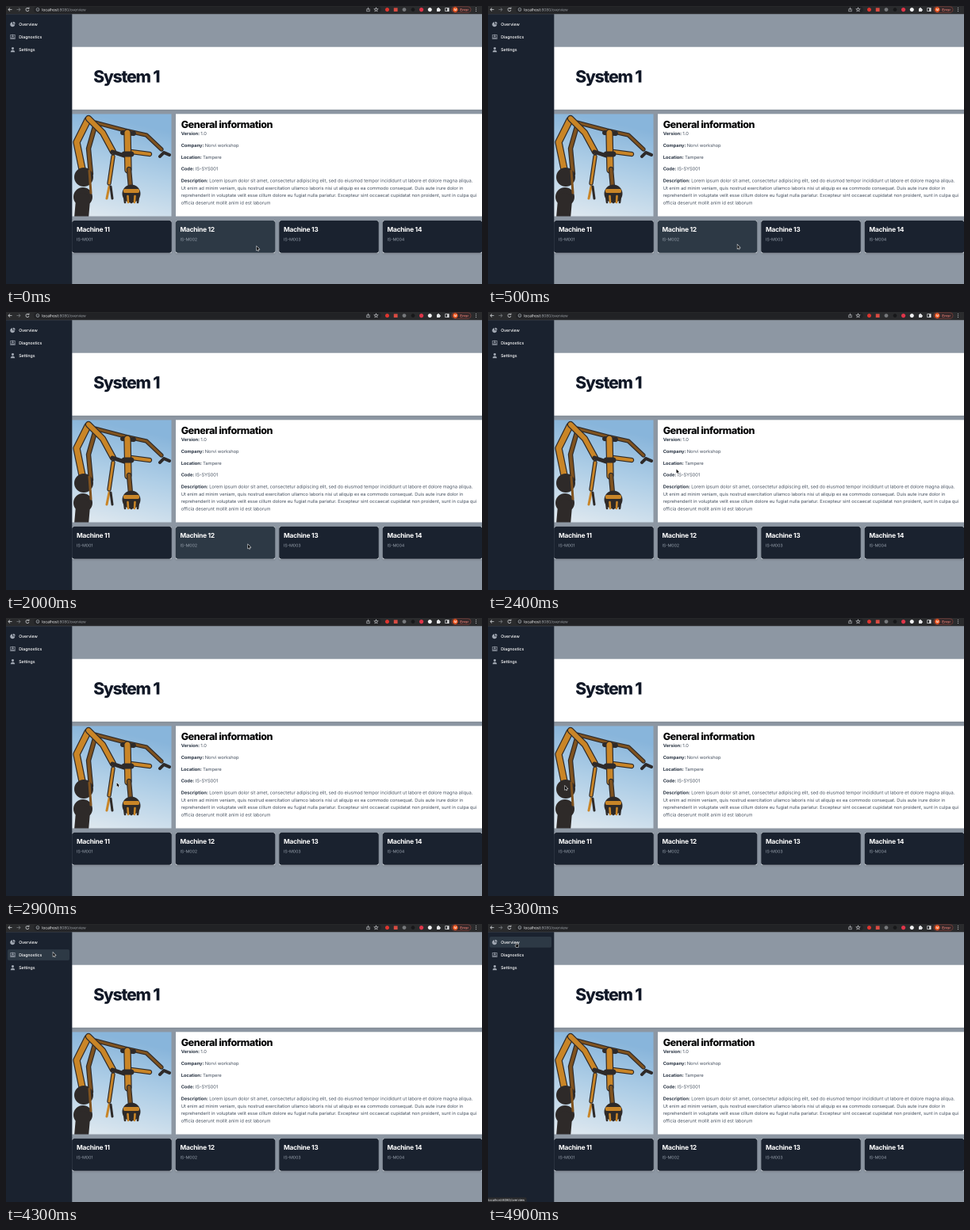
Recreate the animation shown at these times as an HTML page with a canvas. Size 600x351 px, loop 5 s.

```html
<!DOCTYPE html>
<html lang="en">
<head>
<meta charset="utf-8">
<title>System overview</title>
<style>
html, body { margin: 0; width: 100%; height: 100%; overflow: hidden; background: #8d97a3; }
canvas { display: block; width: 600px; height: 351px; }
</style>
</head>
<body>
<canvas id="stage"></canvas>
<script>
const LOOP = 5000, STEP = 100, SCALE = 2;
const NAVY = '#1a222f', HOVER = '#2d3945', BAR = '#2a2b2d';
const canvas = document.getElementById('stage');
canvas.width = 600 * SCALE;
canvas.height = 351 * SCALE;
const ctx = canvas.getContext('2d');
ctx.scale(SCALE, SCALE);
ctx.textRendering = 'geometricPrecision';

// Pointer path: time, x, y
const PATH = [
  [0, 316, 303.5], [600, 314, 301], [1700, 314, 301], [2000, 305, 293.5],
  [2200, 276, 252], [2400, 237.5, 198.5], [2800, 160, 206], [3100, 99, 212],
  [3300, 97, 212], [3600, 76, 57], [3800, 69.5, 41.5], [4200, 67, 40],
  [4600, 36, 23.8], [5000, 36, 23.8]
];

function pointerAt(t) {
  const i = PATH.findIndex(p => p[0] > t);
  const [t0, x0, y0] = PATH[i - 1], [t1, x1, y1] = PATH[i];
  const k = (t - t0) / (t1 - t0);
  return { x: x0 + (x1 - x0) * k, y: y0 + (y1 - y0) * k };
}

const inside = (p, x, y, w, h) => p.x >= x && p.x < x + w && p.y >= y && p.y < y + h;

function rect(x, y, w, h, color) {
  ctx.fillStyle = color;
  ctx.fillRect(x, y, w, h);
}

function frame(x, y, w, h, color, width = 0.7) {
  ctx.strokeStyle = color;
  ctx.lineWidth = width;
  ctx.strokeRect(x, y, w, h);
}

function rounded(x, y, w, h, r, color) {
  ctx.fillStyle = color;
  ctx.beginPath();
  ctx.roundRect(x, y, w, h, r);
  ctx.fill();
}

function disc(x, y, r, color) {
  ctx.fillStyle = color;
  ctx.beginPath();
  ctx.arc(x, y, r, 0, Math.PI * 2);
  ctx.fill();
}

function ring(x, y, r, color, from = 0, to = Math.PI * 2) {
  ctx.strokeStyle = color;
  ctx.lineWidth = 0.8;
  ctx.beginPath();
  ctx.arc(x, y, r, from, to);
  ctx.stroke();
}

function line(points, color, width = 0.8) {
  ctx.strokeStyle = color;
  ctx.lineWidth = width;
  ctx.beginPath();
  points.forEach(([x, y]) => ctx.lineTo(x, y));
  ctx.stroke();
}

// Draws text and returns the x where it ends
function text(str, x, y, size, weight, color, spacing = 0) {
  ctx.font = `${weight} ${size}px Inter, "Liberation Sans", sans-serif`;
  ctx.letterSpacing = spacing + 'px';
  ctx.fillStyle = color;
  ctx.fillText(str, x, y);
  return x + ctx.measureText(str).width;
}

function withShadow(alpha, drawShape) {
  ctx.save();
  ctx.shadowColor = `rgba(0,0,0,${alpha})`;
  ctx.shadowBlur = 2 * SCALE;
  ctx.shadowOffsetY = 0.6 * SCALE;
  drawShape();
  ctx.restore();
}

function star(x, y, r, color) {
  ctx.beginPath();
  for (let i = 0; i < 10; i++) {
    const a = i * Math.PI / 5 - Math.PI / 2, d = i % 2 ? r * 0.45 : r;
    ctx.lineTo(x + d * Math.cos(a), y + d * Math.sin(a));
  }
  ctx.closePath();
  ctx.strokeStyle = color;
  ctx.lineWidth = 0.6;
  ctx.stroke();
}

function toolbar() {
  const ink = '#c9cbcf', dim = '#74777b', pale = '#e3e4e6';
  rect(0, 0, 600, 10.2, BAR);
  rounded(35, 0.6, 438, 8, 4, '#212225');
  line([[7.5, 4.5], [3, 4.5]], ink);
  line([[5, 2.5], [3, 4.5], [5, 6.5]], ink);
  line([[13.5, 4.5], [18, 4.5]], dim);
  line([[16, 2.5], [18, 4.5], [16, 6.5]], dim);
  ring(27, 4.5, 2, ink, 0.3, 5.4);
  line([[27, 3.2], [29, 3.2], [29, 1.6]], ink);
  ring(40, 4.5, 1.9, '#9aa0a6');
  line([[40, 4], [40, 5.6]], '#9aa0a6', 0.6);
  const end = text('localhost', 45.2, 6.4, 4.9, 400, '#f1f2f3');
  text(':8080/overview', end, 6.4, 4.9, 400, '#969a9f', -0.13);

  frame(454.8, 3.8, 3.4, 3, ink, 0.6);
  line([[456.5, 5.2], [456.5, 1.6]], ink, 0.6);
  star(466.5, 4.6, 2.6, ink);

  disc(480.5, 4.6, 2.5, '#e0352f');
  rect(488.8, 2.4, 4.8, 4.6, '#d94b42');
  disc(502, 4.6, 2.4, '#77797c');
  disc(513, 4.6, 2.3, '#17181a');
  disc(523.6, 4.6, 2.6, '#e0354a');
  disc(534.3, 4.6, 2.5, '#f0f1f2');
  rounded(543, 3, 4, 4, 0.5, pale);
  disc(545, 2.8, 0.9, pale);
  disc(547.1, 5, 0.9, pale);
  frame(553.8, 2.6, 4.4, 4, pale);
  rect(556.2, 2.6, 2, 4, pale);

  rounded(561.3, 0.6, 25, 8, 4, '#a04a40');
  rounded(561.8, 1.1, 24, 7, 3.5, '#33282a');
  disc(566.3, 4.6, 3.3, '#ee5a24');
  text('M', 564.8, 6, 3.8, 500, '#fff');
  text('Error', 572.3, 6.3, 4.7, 500, '#ee8177', -0.06);
  [2.4, 4.5, 6.6].forEach(y => disc(592.5, y, 0.55, ink));
}

function sidebar(pointer) {
  const icon = '#a0a7b2';
  rect(0, 10.2, 83.3, 341, NAVY);
  ['Overview', 'Diagnostics', 'Settings'].forEach((label, i) => {
    const y = 16 + i * 16.1;
    if (inside(pointer, 2, y, 78, 14)) rounded(2, y, 78, 13.8, 2, HOVER);
    text(label, 16.2, y + 8.9, 5.2, 500, '#fff');
  });

  ctx.fillStyle = icon;
  ctx.beginPath();
  ctx.moveTo(8.2, 23.3);
  ctx.arc(8.2, 23.3, 3, 0, Math.PI * 1.5);
  ctx.fill();
  ctx.beginPath();
  ctx.moveTo(9, 22.5);
  ctx.arc(9, 22.5, 2.7, -Math.PI / 2, 0);
  ctx.fill();

  frame(5.8, 36.4, 5.4, 5.2, icon);
  line([[5.8, 40], [7.2, 40], [7.6, 40.8], [9.4, 40.8], [9.8, 40], [11.2, 40]], icon, 0.7);
  line([[8.5, 35.8], [8.5, 39]], icon, 0.7);
  line([[7.2, 37.9], [8.5, 39.2], [9.8, 37.9]], icon, 0.7);

  disc(8.5, 53.5, 1.5, icon);
  ctx.beginPath();
  ctx.arc(8.5, 58.3, 2.7, Math.PI, 0);
  ctx.fill();
}

function photo() {
  const x = 83.3, y = 136.3, w = 125.2, h = 129.2;
  const dark = '#2e2a29', amber = '#c98527', rust = '#80531f';
  const beam = (points, width, color = amber) => {
    line(points, dark, width + 2.4);
    line(points, color, width);
  };
  ctx.save();
  ctx.beginPath();
  ctx.rect(x, y, w, h);
  ctx.clip();
  const sky = ctx.createLinearGradient(x + 30, y, x, y + h);
  sky.addColorStop(0, '#88b5db');
  sky.addColorStop(0.45, '#b0cfe7');
  sky.addColorStop(1, '#e2eaf0');
  rect(x, y, w, h, sky);
  ctx.lineJoin = ctx.lineCap = 'round';

  // Overhead beam and right arm
  beam([[112, 147], [150, 157], [177, 163], [196, 181]], 3, rust);
  beam([[158, 184], [181, 187]], 4);
  line([[194, 190], [199, 185], [206, 188]], dark, 4);

  // Left legs
  beam([[112, 152], [104, 180], [107, 212]], 4, rust);
  beam([[103, 144], [89, 172], [96, 206]], 7);

  // Front arm with claw
  beam([[104, 142], [122, 160], [135, 184]], 6);
  line([[134, 184], [152, 190]], dark, 5);
  beam([[135, 190], [130, 224]], 3);
  line([[130, 228], [127, 243]], amber, 3);
  line([[132, 228], [134, 243]], dark, 3);

  // Middle column and gripper
  line([[147, 160], [161, 161]], dark, 6);
  beam([[153, 160], [154, 207]], 7);
  line([[149, 187], [158, 187]], dark, 7);
  beam([[155, 206], [157, 229]], 4, rust);
  disc(158, 237, 11.5, dark);
  rounded(148, 231, 20, 5, 2, amber);
  for (let i = 0; i < 5; i++) line([[149 + i * 4.5, 240], [150 + i * 4, 248]], i % 2 ? amber : dark, 2.6);

  // Base joints
  disc(98, 216, 12, dark);
  disc(97, 241, 12, dark);
  line([[97, 245], [95, 268]], dark, 18);
  line([[105, 208], [107, 236]], rust, 3);
  ctx.restore();
}

function info() {
  const dark = '#2b3645', soft = '#465160';
  rect(214, 136.3, 386, 129.2, '#fff');
  text('General information', 220.7, 154.2, 12.5, 800, '#040506', -0.42);
  const fields = [
    ['Version:', '1.0', 163.2],
    ['Company:', 'Norvi workshop', 178],
    ['Location:', 'Tampere', 192.8],
    ['Code:', 'IS-SYS001', 207.6],
    ['Description:', 'Lorem ipsum dolor sit amet, consectetur adipiscing elit, sed do eiusmod tempor incididunt ut labore et dolore magna aliqua.', 222.6]
  ];
  for (const [label, value, y] of fields) {
    const end = text(label + ' ', 220.7, y, 5.71, 700, dark);
    text(value, end, y, 5.71, 400, soft);
  }
  [
    'Ut enim ad minim veniam, quis nostrud exercitation ullamco laboris nisi ut aliquip ex ea commodo consequat. Duis aute irure dolor in',
    'reprehenderit in voluptate velit esse cillum dolore eu fugiat nulla pariatur. Excepteur sint occaecat cupidatat non proident, sunt in culpa qui',
    'officia deserunt mollit anim id est laborum'
  ].forEach((row, i) => text(row, 220.7, 231.9 + i * 9.3, 5.71, 400, soft));
}

function cards(pointer) {
  for (let i = 0; i < 4; i++) {
    const x = 83.3 + i * 130.5;
    const hot = inside(pointer, x, 271, 125.5, 41);
    withShadow(0.2, () => rounded(x, 270.9, 125.5, 41.2, 1.5, '#d5dae0'));
    rounded(x, 270.9, 125.5, 40.8, 3, hot ? HOVER : NAVY);
    text('Machine 1' + (i + 1), x + 5.7, 285.2, 8.3, 700, '#fff', -0.24);
    text('IS-M00' + (i + 1), x + 5.7, 296.3, 5.2, 400, '#9aa3af');
  }
}

function glyph({ x, y }, points) {
  ctx.beginPath();
  points.forEach(([dx, dy]) => ctx.lineTo(x + dx, y + dy));
  ctx.closePath();
  ctx.strokeStyle = '#fff';
  ctx.lineWidth = 0.9;
  ctx.stroke();
  ctx.fillStyle = '#0b0c0e';
  ctx.fill();
}

const ARROW = [[0, 0], [0, 4.9], [1.1, 3.9], [1.9, 5.6], [2.7, 5.2], [1.9, 3.6], [3.4, 3.5]];
const HAND = [[-0.5, 0], [0.5, 0], [0.6, 1.9], [2.6, 2.5], [2.6, 4.1], [1.9, 5.5], [-0.4, 5.5], [-1.8, 3.5], [-1.2, 3], [-0.5, 3.6]];

function draw(t) {
  const pointer = pointerAt(t);
  rect(0, 0, 600, 351, '#8d97a3');
  withShadow(0.15, () => rect(83.3, 51.7, 517, 79.1, '#fff'));
  text('System 1', 110.2, 96.3, 21, 800, '#111827', -1.19);
  photo();
  info();
  cards(pointer);
  sidebar(pointer);
  toolbar();
  if (t >= 4900) {
    rounded(-2, 345.3, 50.5, 8, 1.5, BAR);
    text('localhost:8080/overview', 0.2, 350, 4.2, 400, '#e3e5e8', -0.13);
  }
  glyph(pointer, inside(pointer, 2, 16, 40, 14) ? HAND : ARROW);
}

function tick() {
  const t = performance.now() % LOOP;
  draw(Math.floor(t / STEP) * STEP);
  requestAnimationFrame(tick);
}
tick();
</script>
</body>
</html>
```
